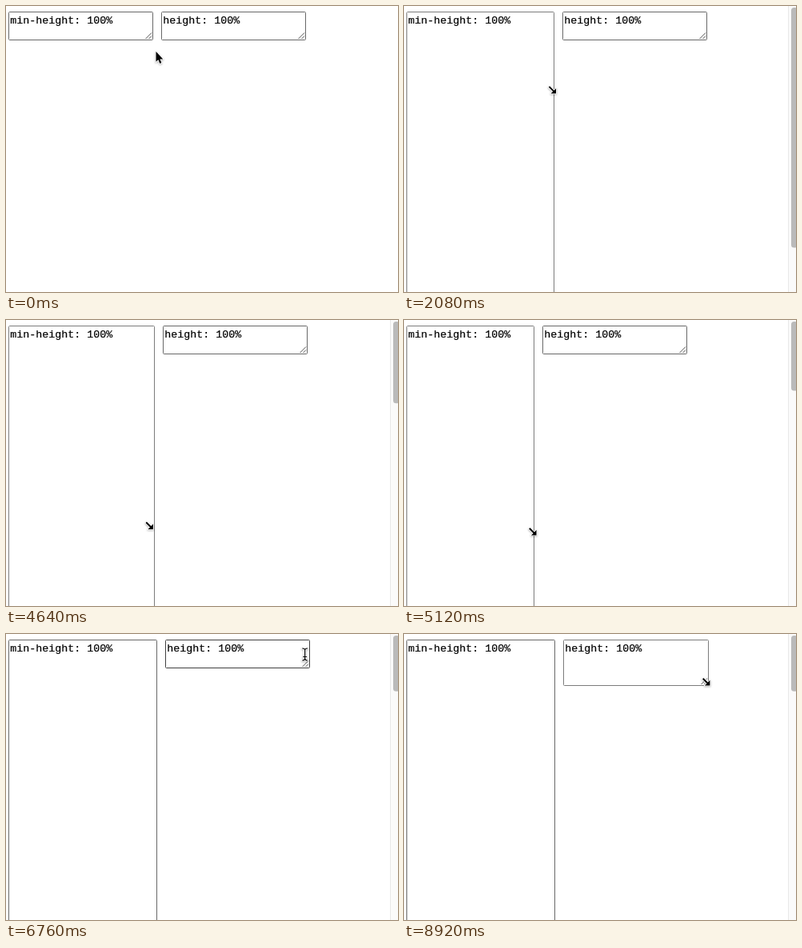
Write an HTML page that moves like this. It is 490 by 358 pixels and loops after 8.96 s.

```html
<!DOCTYPE html>
<html lang="en">
<head>
<meta charset="utf-8">
<title>Resizing text boxes</title>
<style>
  html, body { margin: 0; width: 100%; height: 100%; overflow: hidden; background: #fff; }
  svg { display: block; width: 490px; height: 358px; }
  text { font: 13.333px "Liberation Mono", "Courier New", monospace; fill: #000; stroke: #000; stroke-width: .2px; white-space: pre; }
  .grip { fill: none; stroke: #505050; stroke-width: 1; }
  .shape { fill: #000; stroke: #fff; stroke-width: 1.8; stroke-linejoin: round; paint-order: stroke; }
  #cursor { filter: drop-shadow(0 1px 1px rgba(0, 0, 0, .3)); }
  #beam { fill: none; stroke-linecap: round; }
</style>
</head>
<body>
<svg viewBox="0 0 490 358">
  <defs>
    <path id="grip" class="grip" d="M-9.5 -2L-2 -9.5M-5.5 -2L-2 -5.5"/>
    <path id="stem" d="M-3 -7.5Q0 -7.5 0 -5V5Q0 7.5 -3 7.5M3 -7.5Q0 -7.5 0 -5M0 5Q0 7.5 3 7.5M-2 3H2"/>
  </defs>
  <g id="left">
    <rect fill="#fff" rx="1"/>
    <text y="22">min-height: 100%</text>
    <use href="#grip"/>
  </g>
  <g id="right">
    <rect fill="#fff" rx="1"/>
    <text y="22">height: 100%</text>
    <use href="#grip"/>
  </g>
  <g id="bar">
    <rect x="480" width="10" height="358" fill="#fafafa"/>
    <rect x="480" width="1" height="358" fill="#e8e8e8"/>
    <rect id="thumb" x="484" y="2" width="8" rx="3.5" fill="#bababa"/>
  </g>
  <g id="cursor">
    <path id="arrow" class="shape" d="M0 0V12.8L2.8 10.2L4.8 15L6.9 14.1L4.9 9.4H8.8Z"/>
    <g id="beam">
      <use href="#stem" stroke="#fff" stroke-width="3"/>
      <use href="#stem" stroke="#000" stroke-width="1.2"/>
    </g>
    <path id="resize" class="shape" d="M-5 -3.6L-3.6 -5L1.9 .5L4.4 -2.2V4.4H-2.2L.5 1.9Z"/>
  </g>
</svg>
<script>
const LOOP = 8960, STEP = 40, VIEW = 358;
const GROWTH = 18.6; // page height gained per step of dragging
const GRIP_X = 3, GRIP_Y = 5; // from the pointer to the dragged corner
const LEFT_DRAG = [960, 5960], RIGHT_DRAG = [7680, LOOP];
const $ = id => document.getElementById(id);

// Pointer moves: start, end, and the place reached.
const origin = { x: 187.5, y: 57 };
const moves = [
  [0, 520, 181, 38],
  [960, 1680, 184, 88],
  [1880, 2600, 190, 150],
  [2840, 3280, 195.5, 189],
  [3280, 3640, 190, 226],
  [3880, 4200, 190, 253],
  [4520, 4920, 155, 268],
  [4920, 5560, 174.6, 258.5],
  [5640, 5960, 186, 250],
  [5960, 6360, 352, 122],
  [6360, 6520, 373, 23],
  [6720, 6960, 377, 38],
  [7680, 8200, 380, 290],
  [8200, 8600, 379, 153],
  [8600, 8880, 378, 60]
];

const clamp = (v, lo, hi) => Math.min(hi, Math.max(lo, v));

function pointerAt(t) {
  let { x, y } = origin;
  for (const [start, end, toX, toY] of moves) {
    const p = clamp((t - start) / (end - start), 0, 1);
    x += (toX - x) * p;
    y += (toY - y) * p;
  }
  return { x, y };
}

// The corner trails the pointer by one step and stays put outside its drag.
function cornerAt(t, [from, to]) {
  const p = pointerAt(clamp(t - STEP, from, to));
  return { x: Math.round(p.x) + GRIP_X, y: Math.round(p.y) + GRIP_Y };
}

// The page fills the view first, then keeps growing while the pointer moves.
function pageAt(t) {
  let dragged = 0;
  for (const [start, end] of moves) {
    if (start >= LEFT_DRAG[0] && end <= LEFT_DRAG[1]) dragged += clamp(t, start, end) - start;
  }
  const grown = dragged / STEP * GROWTH;
  return Math.max(Math.min(50 + grown, VIEW + 14), grown - 6);
}

function set(el, attrs) {
  for (const name in attrs) el.setAttribute(name, attrs[name]);
}

function drawBox(id, x, right, bottom, border) {
  const [rect, label, grip] = $(id).children;
  set(rect, { x: x + .5, y: 7.5, width: right - x - 1, height: bottom - 8, stroke: border });
  set(label, { x: x + 2.2 });
  set(grip, { x: right, y: bottom });
}

function borderColor(t, hover, press, leave) {
  if (t < hover || t >= leave) return "#686868";
  return t < press ? "#404040" : "#7c7c7c";
}

function cursorKind(t) {
  if (t < 440) return "arrow";
  if (t < 6000) return "resize";
  if (t < 6480) return "arrow";
  return t < 6880 ? "beam" : "resize";
}

function draw(time) {
  const t = Math.floor(time / STEP) * STEP;
  const edge = cornerAt(t, LEFT_DRAG).x;
  const corner = cornerAt(t, RIGHT_DRAG);
  const widened = corner.x - cornerAt(0, RIGHT_DRAG).x;
  const page = pageAt(t);

  drawBox("left", 3, edge, Math.round(page) - 7, borderColor(t, 440, 840, 6000));
  drawBox("right", edge + 10, edge + 191 + widened, corner.y, borderColor(t, 6480, 7560, LOOP));

  $("bar").style.display = page > VIEW ? "" : "none";
  set($("thumb"), { height: Math.min(VIEW - 4, (VIEW - 4) * VIEW / page) });

  const { x, y } = pointerAt(t);
  set($("cursor"), { transform: `translate(${x} ${y})` });
  const kind = cursorKind(t);
  for (const id of ["arrow", "beam", "resize"]) $(id).style.display = id === kind ? "" : "none";
}

const start = performance.now();
function tick() {
  draw((performance.now() - start) % LOOP);
  requestAnimationFrame(tick);
}
tick();
</script>
</body>
</html>
```
